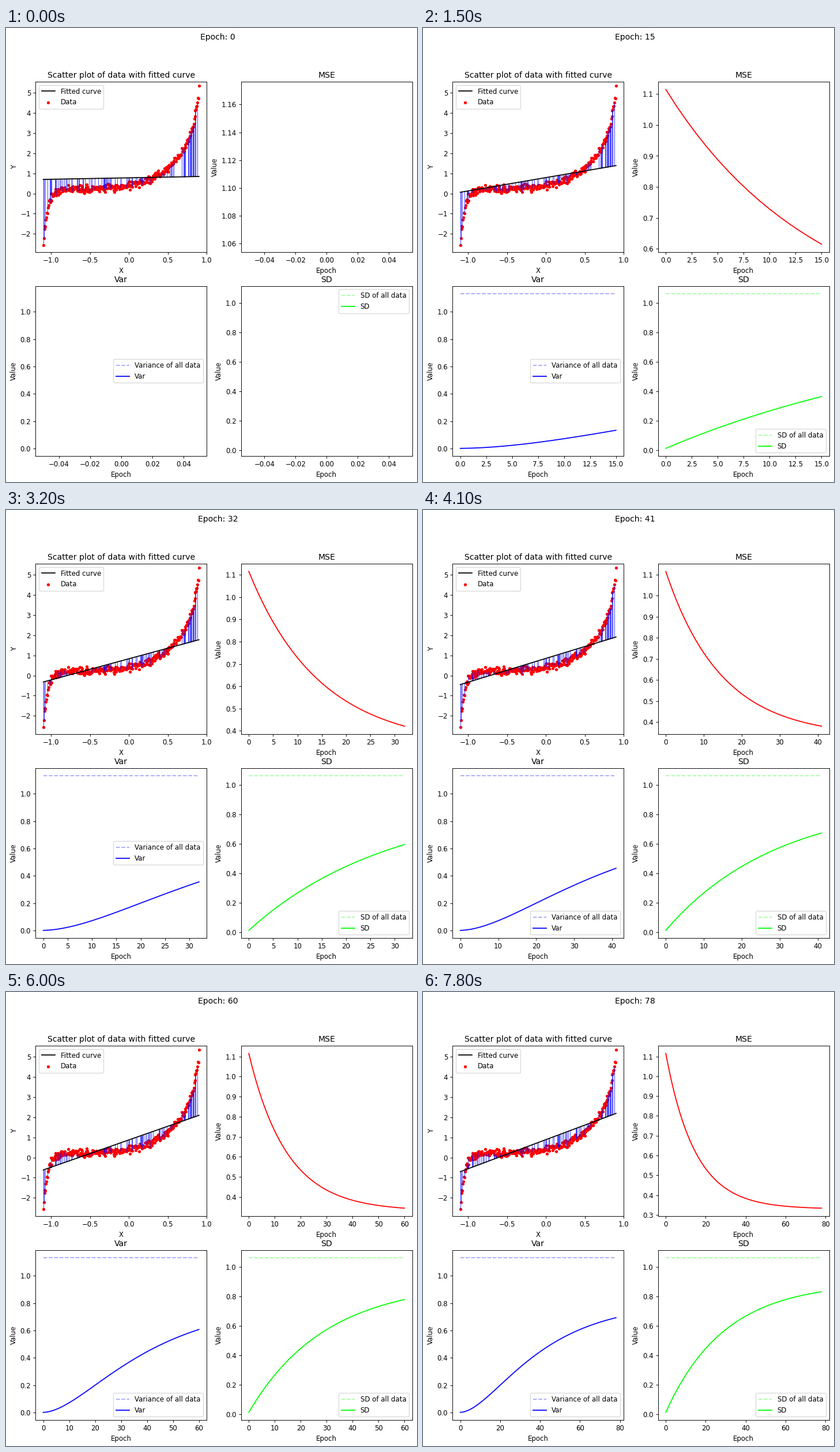
A matplotlib script that plays this animation: 713 px wide and 786 px high, repeating every 7900 ms.

```python
import numpy as np
import matplotlib.pyplot as plt
from matplotlib.animation import FuncAnimation

W, H, DPI = 713, 786, 84.3
EPOCHS = 79
X_MIN, X_MAX = -1.1, 0.9

# Statistics of the data set and its best straight line
MEAN_X, VAR_X = -0.1, 1 / 3
MEAN_Y, VAR_Y = 0.748, 1.133
BEST_SLOPE, RESIDUAL = 1.5545, 0.330
RATE = 0.1


def trend(x):
    """Slow growth with a steep drop at the left and rise at the right end."""
    body = 0.12 + 0.13 * x ** 2 + 0.27 * np.exp(2.8 * x)
    drop = 2.8 * np.exp((X_MIN - x) / 0.058)
    rise = 1.6 * np.exp((x - X_MAX) / 0.06)
    return body - drop + rise


def descend(steps):
    """Gradient descent on slope and mean prediction."""
    slope, level = 0.0208, 0.78
    path = []
    for _ in range(steps):
        path.append((slope, level))
        err, gap = level - MEAN_Y, VAR_X * (slope - BEST_SLOPE)
        d_slope = -RATE * (MEAN_X * err + gap)
        level += -RATE * err + MEAN_X * d_slope
        slope += d_slope
    return np.array(path).T


rng = np.random.default_rng(4)
xs = np.linspace(X_MIN, X_MAX, 300)
ys = trend(xs) + np.clip(rng.normal(0, 0.1, xs.size), -0.22, 0.22)
tied = rng.choice(xs.size, 100, replace=False)

slopes, levels = descend(EPOCHS + 1)
mse = RESIDUAL + VAR_X * (slopes - BEST_SLOPE) ** 2 + (levels - MEAN_Y) ** 2
var = VAR_X * slopes ** 2
sd = np.sqrt(var)

# The tiny surplus keeps the pixel size from rounding down
fig, axes = plt.subplots(2, 2, dpi=DPI,
                         figsize=((W + 0.001) / DPI, (H + 0.001) / DPI))
fig.subplots_adjust(left=51.2 / W, right=704.8 / W, top=1 - 93 / H,
                    bottom=1 - 741.2 / H, wspace=0.2, hspace=0.2)
heading = fig.text(367.5 / W, 1 - 8.8 / H, "", fontsize=12,
                   ha="center", va="top")
(ax_fit, ax_mse), (ax_var, ax_sd) = axes

ends = np.array([X_MIN, X_MAX])
fit_line, = ax_fit.plot(ends, ends, color="black", label="Fitted curve", zorder=3)
ax_fit.scatter(xs, ys, s=12, color="red", label="Data")
bars = ax_fit.vlines(xs[tied], 0, ys[tied], color="blue", lw=0.8, alpha=0.75)
ax_fit.set(title="Scatter plot of data with fitted curve", xlabel="X",
           ylabel="Y", xlim=(-1.2, 1.0), ylim=(-2.9, 5.55))
ax_fit.legend(loc="upper left")


def setup_history(ax, title, values, color, total=None, total_label=None):
    """Prepare one growing chart; return its (line, values) pairs."""
    ax.set(title=title, xlabel="Epoch", ylabel="Value")
    pairs = []
    if total is not None:
        dashed, = ax.plot([], [], "--", color=color, alpha=0.35, label=total_label)
        pairs.append((dashed, np.full(len(values), total)))
    line, = ax.plot([], [], color=color, label=title)
    pairs.append((line, values))
    if total is not None:
        ax.legend(loc="best")
    return pairs


histories = (
    setup_history(ax_mse, "MSE", mse, "red")
    + setup_history(ax_var, "Var", var, "blue", VAR_Y, "Variance of all data")
    + setup_history(ax_sd, "SD", sd, "lime", np.sqrt(VAR_Y), "SD of all data")
)


def update(epoch):
    heading.set_text(f"Epoch: {epoch}")

    # The drawn line already includes this epoch's step
    def predict(x):
        return levels[epoch + 1] + slopes[epoch + 1] * (x - MEAN_X)

    fit_line.set_ydata(predict(ends))
    bars.set_segments([[(x, y), (x, predict(x))]
                       for x, y in zip(xs[tied], ys[tied])])

    for line, values in histories:
        line.set_data(np.arange(epoch + 1), values[:epoch + 1])
    for ax in (ax_mse, ax_var, ax_sd):
        ax.relim()
        ax.autoscale_view()


anim = FuncAnimation(fig, update, frames=EPOCHS, interval=100,
                     repeat=True, repeat_delay=0)
plt.show()
```
